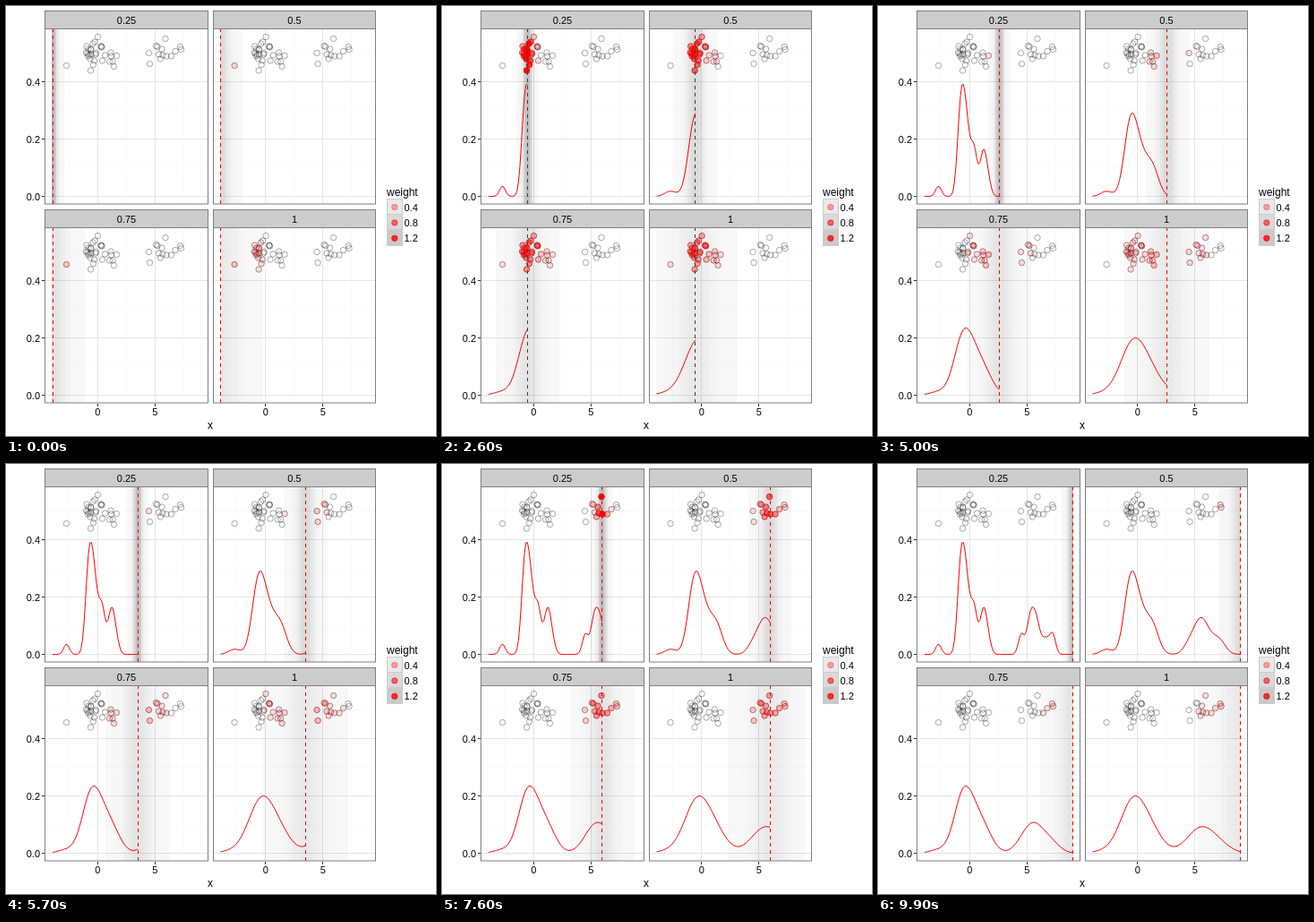
Write an HTML page with a canvas that moves like this. It is 480 by 480 pixels and loops after 10 s.

```html
<!DOCTYPE html>
<html lang="en">
<head>
<meta charset="utf-8">
<title>Kernel density by bandwidth</title>
<style>
html, body { margin: 0; width: 100%; height: 100%; overflow: hidden; background: #fff; }
canvas { display: block; }
</style>
</head>
<body>
<canvas id="stage" width="480" height="480"></canvas>
<script>
const ctx = document.getElementById('stage').getContext('2d');
const STEPS = 100, STEP_MS = 100;
const X0 = 52, DX = 165 / 99;          // sweep start and step, in pixels
const UNIT = 12.8, BASE = 212.5, YS = 320;
const TOTAL = 45, CUTOFF = 0.0005, PEAK = 1.596;
const W = 182, H = 195;
const FONT = '"Liberation Sans", Arial, sans-serif';

// sample positions in the first panel
const dots = [
  [67.5, 66.5], [90, 45], [89.5, 52], [91, 53], [92, 48], [94.5, 48], [95, 49],
  [93, 55], [91.5, 56], [94, 59], [95, 54], [94.5, 72], [97.5, 65.5], [98.5, 61],
  [97, 42], [99, 40], [102.5, 34.5], [100, 54], [100.5, 52.5], [106, 45],
  [106.5, 45.5], [107, 46], [107.5, 61], [110.5, 55], [115.5, 62], [117, 52],
  [117.5, 56], [119, 62], [120.5, 67.5], [123.5, 55.5],
  [159.5, 52.5], [160.5, 64.5], [167.5, 44.5], [169, 45.5], [170.5, 54],
  [172.5, 59], [174, 48], [175, 55], [178, 36.5], [179, 56], [184.5, 56],
  [189, 50.5], [194.5, 45.5], [195.5, 48.5]
];

const kernel = (d, h) => {
  const z = d / (h * UNIT);
  return Math.exp(-z * z / 2) / (h * Math.sqrt(2 * Math.PI));
};
const alpha = w => 0.1 + 0.9 * Math.min(1, w / PEAK);
const gridX = i => X0 + i * DX;
const crisp = v => Math.floor(v) + 0.5;

const panels = [0.25, 0.5, 0.75, 1].map((h, k) => {
  const curve = [];
  for (let i = 0; i < STEPS; i++) {
    const sum = dots.reduce((s, d) => s + kernel(gridX(i) - d[0], h), 0);
    curve.push(BASE - YS * sum / TOTAL);
  }
  return { h, curve, dx: k % 2 ? 187.6 : 0, dy: k > 1 ? 222 : 0 };
});

function line(x1, y1, x2, y2, color) {
  ctx.strokeStyle = color;
  ctx.beginPath();
  ctx.moveTo(x1, y1);
  ctx.lineTo(x2, y2);
  ctx.stroke();
}

function text(s, x, y, align, size) {
  ctx.font = size + 'px ' + FONT;
  ctx.textAlign = align;
  ctx.fillStyle = '#000';
  ctx.fillText(s, x, y);
}

function circle(x, y) {
  ctx.beginPath();
  ctx.arc(x, y, 3.2, 0, 2 * Math.PI);
}

function redDot(x, y, w) {
  ctx.fillStyle = ctx.strokeStyle = `rgba(255,0,0,${alpha(w)})`;
  circle(x, y);
  ctx.fill();
  ctx.stroke();
}

function shade(w) {
  return `rgba(0,0,0,${0.27 * alpha(w)})`;
}

function drawGrid(left, p) {
  const h = (y, c) => line(left, crisp(y + p.dy), left + W, crisp(y + p.dy), c);
  const v = (x, c) => line(crisp(x + p.dx), 26 + p.dy, crisp(x + p.dx), 221 + p.dy, c);
  [52, 116, 180].forEach(y => h(y, '#fafafa'));
  [70, 134, 198].forEach(x => v(x, '#fafafa'));
  [84, 148, 212].forEach(y => h(y, '#e5e5e5'));
  [102, 166].forEach(x => v(x, '#e5e5e5'));
}

function drawPanel(p, step) {
  const { h, dx, dy } = p, left = dx ? 231 : 43, pos = gridX(step);
  const right = left + W - (dx ? 1 : 0);
  ctx.save();
  ctx.beginPath();
  ctx.rect(left, 26 + dy, right - left, H);
  ctx.clip();
  drawGrid(left, p);

  for (let i = 0; i < STEPS; i++) {
    const w = kernel(gridX(i) - pos, h);
    if (w < CUTOFF) continue;
    const a = Math.round(gridX(i - 0.5) + dx), b = Math.round(gridX(i + 0.5) + dx);
    ctx.fillStyle = shade(w);
    ctx.fillRect(a, 26 + dy, b - a, H);
  }

  for (const [x, y] of dots) {
    ctx.strokeStyle = 'rgba(0,0,0,0.33)';
    circle(x + dx, y + dy);
    ctx.stroke();
  }
  for (const [x, y] of dots) {
    const w = kernel(x - pos, h);
    if (w >= CUTOFF) redDot(x + dx, y + dy, w);
  }

  ctx.strokeStyle = '#f00';
  ctx.beginPath();
  for (let i = 0; i <= step; i++) ctx.lineTo(gridX(i) + dx, p.curve[i] + dy);
  ctx.stroke();

  // the marker darkens as it crosses the densest part
  const dark = Math.exp(-(((step - 26) / 7) ** 2));
  const r = Math.round(255 - 190 * dark), g = Math.round(60 * dark);
  ctx.setLineDash([4, 4]);
  const x = crisp(pos + dx);
  line(x, 221 + dy, x, 26 + dy, `rgb(${r},${g},${g})`);
  ctx.restore();

  ctx.fillStyle = '#ccc';
  ctx.strokeStyle = '#7f7f7f';
  ctx.fillRect(left, 5 + dy, right - left, 20);
  ctx.strokeRect(left + 0.5, 5.5 + dy, right - left, 20);
  ctx.strokeRect(left + 0.5, 25.5 + dy, right - left, H + 0.5);
  text(String(h), (left + right) / 2 + 0.5, 20 + dy, 'center', 11);
}

function drawAxes() {
  for (const dy of [0, 222]) {
    [['0.4', 84], ['0.2', 148], ['0.0', 212]].forEach(([s, y]) => {
      line(40, y + dy + 0.5, 43, y + dy + 0.5, '#333');
      text(s, 38, y + dy + 4.5, 'right', 11);
    });
  }
  for (const dx of [0, 187.6]) {
    [['0', 102], ['5', 166]].forEach(([s, x]) => {
      line(crisp(x + dx), 444, crisp(x + dx), 447, '#333');
      text(s, x + dx + 0.3, 457, 'center', 11);
    });
  }
  text('x', 228, 472, 'center', 12);
}

function drawLegend() {
  text('weight', 425, 212, 'left', 12);
  [0.4, 0.8, 1.2].forEach((w, k) => {
    const y = 215.5 + k * 17.4;
    ctx.fillStyle = shade(w);
    ctx.fillRect(425, Math.round(y), 18, 17);
    ctx.strokeStyle = '#ccc';
    ctx.strokeRect(425.5, crisp(y), 17, 17);
    redDot(433.8, y + 9, w);
    text(w.toFixed(1), 444.5, Math.round(y + 13), 'left', 11);
  });
}

function draw(now) {
  const step = Math.floor(now / STEP_MS) % STEPS;
  ctx.lineWidth = 1;
  ctx.fillStyle = '#fff';
  ctx.fillRect(0, 0, 480, 480);
  panels.forEach(p => drawPanel(p, step));
  drawAxes();
  drawLegend();
}

let start = null;
function tick(now) {
  if (start === null) start = now;
  draw(now - start);
  requestAnimationFrame(tick);
}
draw(0);
requestAnimationFrame(tick);
</script>
</body>
</html>
```
